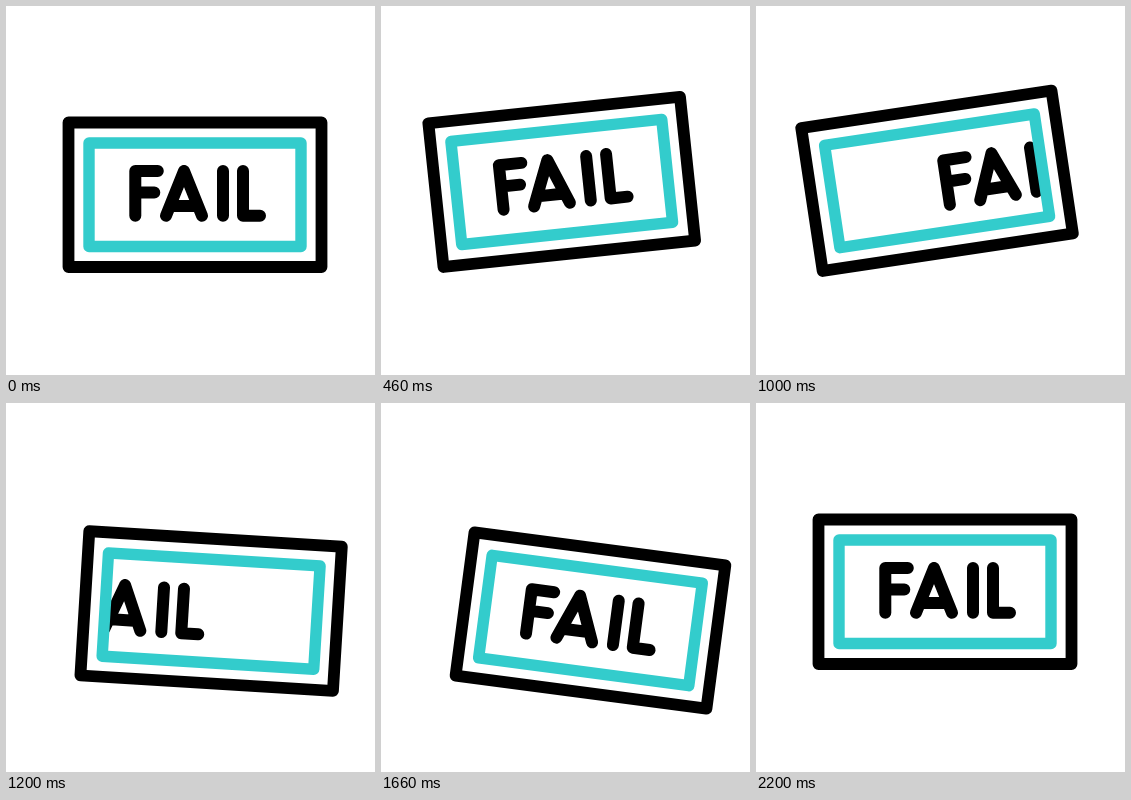
An HTML page with a canvas that plays this animation: 369x369 px, repeating every 2400 ms.

```html
<!DOCTYPE html>
<html lang="en">
<head>
<meta charset="utf-8">
<title>Fail stamp</title>
<style>
html, body { margin: 0; width: 100%; height: 100%; overflow: hidden; background: #fff; }
canvas { display: block; width: 369px; height: 369px; }
</style>
</head>
<body>
<canvas id="stage" width="369" height="369" role="img" aria-label="FAIL"></canvas>
<script>
const ctx = document.getElementById('stage').getContext('2d');
const SIZE = 369, LOOP = 2400, STEP = 20;
const BLACK = '#000', TEAL = '#33cccc';
const BOX = { w: 253, h: 144.5, inset: 20.5 };
const SLIDE = 278, SLIDE_TILT = 0.67;

// Poses: angle in degrees, lower left corner of the box, centre of the word
const REST = { a: 0, px: 62.5, py: 261, wx: 191.5, wy: 187.5 };
const LEFT = { a: -15, px: 62.5, py: 261, wx: 168.1, wy: 156.6 };
const RIGHT = { a: 10, px: 78.6, py: 276.4, wx: 215.5, wy: 226.4 };

const clamp = v => Math.min(1, Math.max(0, v));
const ease = v => v * v * (3 - 2 * v);
const progress = (t, from, to) => ease(clamp((t - from) / (to - from)));

function mix(p, q, k) {
  const out = {};
  for (const key in p) out[key] = p[key] + (q[key] - p[key]) * k;
  return out;
}

function poseAt(t) {
  if (t < 800) return mix(REST, LEFT, progress(t, 200, 800));
  if (t < 1400) return mix(LEFT, RIGHT, progress(t, 800, 1400));
  return mix(RIGHT, REST, progress(t, 1400, 2200));
}

function buildWord() {
  const path = new Path2D(), top = -22.5, base = 22.2;
  const line = (x1, y1, x2, y2) => { path.moveTo(x1, y1); path.lineTo(x2, y2); };
  const stem = x => line(x, top, x, base);
  const arm = (x, y, w) => line(x, y, x + w, y);
  // F
  stem(-62.2);
  arm(-62.2, top, 22.5);
  arm(-62.2, -1, 19);
  // A
  line(-13.5, top, -31.5, base);
  line(-13.5, top, 4.5, base);
  arm(-24.5, 12.5, 22);
  // I, L
  stem(25.5);
  stem(45.5);
  arm(45.5, base, 17);
  return path;
}
const WORD = buildWord();

// Runs paint in a frame moved to x, y and turned by angle
function placed(x, y, angle, paint) {
  ctx.save();
  ctx.translate(x, y);
  ctx.rotate(angle);
  paint();
  ctx.restore();
}

function pen(color, width) {
  ctx.strokeStyle = color;
  ctx.lineWidth = width;
}

function boxPath(inset) {
  ctx.beginPath();
  ctx.rect(inset, inset - BOX.h, BOX.w - 2 * inset, BOX.h - 2 * inset);
}

function draw(t) {
  const pose = poseAt(t), turn = pose.a * Math.PI / 180;
  const inBox = paint => placed(pose.px, pose.py, turn, paint);

  ctx.fillStyle = '#fff';
  ctx.fillRect(0, 0, SIZE, SIZE);
  ctx.lineJoin = ctx.lineCap = 'round';

  inBox(() => { pen(BLACK, 11.8); boxPath(0); ctx.stroke(); });

  // One word leaves on the right while the next enters from the left
  ctx.save();
  inBox(() => boxPath(BOX.inset));
  ctx.clip();
  pen(BLACK, 12);
  const shift = SLIDE * progress(t, 800, 1400), tilt = turn * SLIDE_TILT;
  for (const d of [shift, shift - SLIDE]) {
    placed(pose.wx + d * Math.cos(tilt), pose.wy + d * Math.sin(tilt), turn,
      () => ctx.stroke(WORD));
  }
  ctx.restore();

  inBox(() => { pen(TEAL, 11.4); boxPath(BOX.inset); ctx.stroke(); });
}

const start = performance.now();
function tick() {
  const t = (performance.now() - start) % LOOP;
  draw(Math.floor(t / STEP) * STEP);
  requestAnimationFrame(tick);
}
tick();
</script>
</body>
</html>
```
